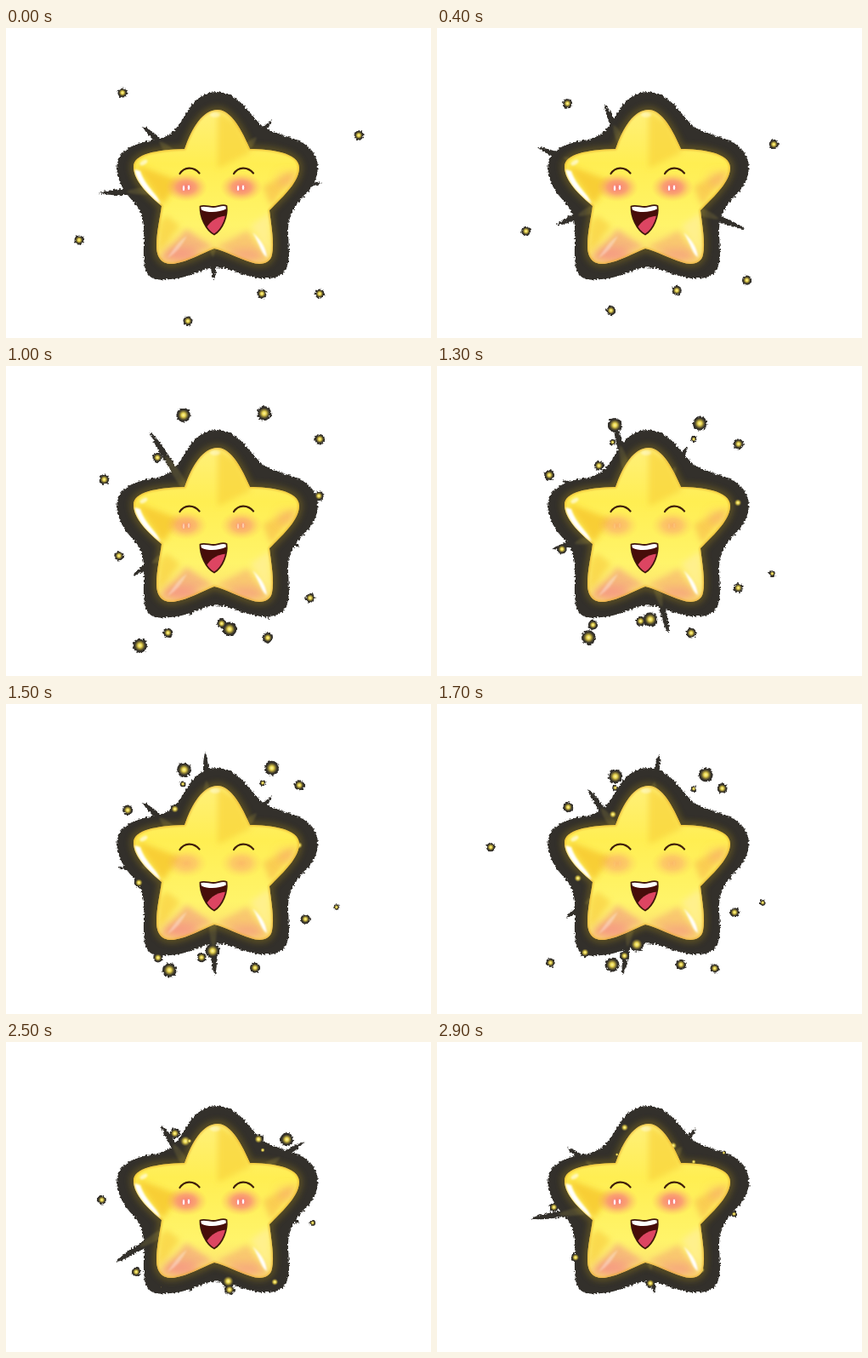
These frames come from a looping animation (500 px wide and 364 px high, 3100 ms). An HTML page:

```html
<!DOCTYPE html>
<html lang="en">
<head>
<meta charset="utf-8">
<title>Happy star</title>
<style>
  html, body { margin: 0; width: 100%; height: 100%; overflow: hidden; background: #fff; }
  svg { display: block; width: 500px; height: 364px; }
</style>
</head>
<body>
<svg viewBox="0 0 500 364">
  <defs>
    <path id="star" d="M249 96C262 96 274 112 287 142C310 142 345 146 345 164C345 180 328 196 310 214C312 232 316 252 313 266C311 277 299 279 288 275C272 270 258 262 245 259C232 264 215 274 197 277C182 278 177 268 177 256C177 240 181 224 183 209C168 196 150 180 150 163C150 148 176 143 210 142C219 116 232 96 249 96Z"/>
    <clipPath id="inside"><use href="#star"/></clipPath>
    <filter id="ragged" filterUnits="userSpaceOnUse" x="0" y="0" width="500" height="364" color-interpolation-filters="sRGB">
      <feTurbulence type="fractalNoise" baseFrequency=".45" numOctaves="1" seed="4"/>
      <feDisplacementMap in="SourceGraphic" scale="5" xChannelSelector="R" yChannelSelector="G"/>
    </filter>
    <filter id="b1" x="-50%" y="-50%" width="200%" height="200%"><feGaussianBlur stdDeviation=".8"/></filter>
    <filter id="b4" x="-50%" y="-50%" width="200%" height="200%"><feGaussianBlur stdDeviation="3.5"/></filter>
    <filter id="b7" x="-50%" y="-50%" width="200%" height="200%"><feGaussianBlur stdDeviation="6"/></filter>
    <linearGradient id="skin" x1="0" y1="0" x2="0" y2="1">
      <stop offset="0" stop-color="#fff07a"/>
      <stop offset=".35" stop-color="#ffee52"/>
      <stop offset=".75" stop-color="#fff46a"/>
      <stop offset="1" stop-color="#fbdc70"/>
    </linearGradient>
    <radialGradient id="spark">
      <stop offset="0" stop-color="#fff6a0"/>
      <stop offset=".35" stop-color="#e6d350"/>
      <stop offset=".65" stop-color="#a8963a" stop-opacity=".7"/>
      <stop offset="1" stop-color="#6a5e26" stop-opacity="0"/>
    </radialGradient>
    <radialGradient id="pink">
      <stop offset="0" stop-color="#f77c74"/>
      <stop offset=".45" stop-color="#f98f76" stop-opacity=".8"/>
      <stop offset="1" stop-color="#fcc060" stop-opacity="0"/>
    </radialGradient>
    <path id="eye" d="M-11 4C-6 -4 5 -5 12 3.5" fill="none" stroke="#40200c" stroke-width="2.2" stroke-linecap="round"/>
    <g id="marks" fill="#fff" stroke="#f57c78" stroke-width=".8">
      <ellipse cx="-3" cy=".6" rx="1.7" ry="3.5"/>
      <ellipse cx="3" cy="-.2" rx="1.7" ry="3.3"/>
    </g>
  </defs>

  <g fill="#33302b" filter="url(#ragged)">
    <g id="rayShade"></g>
    <g id="dotShade"></g>
    <path d="M249 75C272 76 284 97 298 112C312 126 340 126 355 139C372 153 370 176 354 194C338 210 331 222 332 243C333 262 336 282 322 291C304 298 285 292 266 285C252 280 240 280 228 286C212 293 192 297 176 295C160 291 162 270 162 250C163 232 162 216 150 204C136 190 128 172 131 158C134 141 158 133 178 131C200 126 206 108 216 94C224 82 235 75 249 75Z"/>
  </g>
  <use href="#star" fill="none" stroke="#77651c" stroke-width="8" opacity=".6" filter="url(#b4)"/>
  <g id="rayLight" fill="#ffe85c" opacity=".12" filter="url(#b1)"></g>
  <g id="dotLight" fill="url(#spark)"></g>

  <use href="#star" fill="url(#skin)"/>
  <g clip-path="url(#inside)">
    <g filter="url(#b4)">
      <path d="M249 98L249 165L288 146L274 112Z" fill="#f8d43c" opacity=".75"/>
      <path d="M152 160L205 180L184 208Z" fill="#f7c62c" opacity=".8"/>
      <path d="M344 165L302 186L312 210Z" fill="#f9c650" opacity=".8"/>
      <path d="M179 274L212 236L244 258Z" fill="#f6b07c" opacity=".8"/>
      <path d="M179 265L180 230L188 220L205 232Z" fill="#f8d244" opacity=".75"/>
      <path d="M310 276L284 238L247 258Z" fill="#f8c070" opacity=".8"/>
      <path d="M311 272L288 232L310 217Z" fill="#fff08c"/>
    </g>
    <g filter="url(#b7)" fill="#f59088">
      <ellipse cx="208" cy="267" rx="21" ry="9" opacity=".8"/>
      <ellipse cx="280" cy="268" rx="21" ry="7" opacity=".65"/>
      <ellipse cx="331" cy="178" rx="12" ry="8" opacity=".35"/>
    </g>
    <use href="#star" fill="none" stroke="#e6a62c" stroke-width="2.6" opacity=".7" filter="url(#b1)"/>
    <g filter="url(#b1)" fill="#fff">
      <path d="M151 166C154 183 168 196 182 207C178 194 164 187 158 168Z"/>
      <path d="M290 240C299 248 306 257 307 269C300 265 299 254 290 240Z"/>
      <path d="M190 270C197 260 203 250 213 244C207 255 201 264 190 270Z" opacity=".35"/>
      <ellipse cx="162" cy="158" rx="5" ry="2.5" opacity=".6" transform="rotate(-30 162 158)"/>
      <ellipse cx="246" cy="102" rx="6" ry="3" opacity=".4"/>
    </g>
  </g>

  <g id="blush" fill="url(#pink)">
    <ellipse cx="212" cy="187" rx="25" ry="17"/>
    <ellipse cx="277" cy="187" rx="25" ry="17"/>
  </g>
  <g id="shine">
    <use href="#marks" x="212" y="187.5"/>
    <use href="#marks" x="276" y="187.5"/>
  </g>
  <use href="#eye" x="215.5" y="167"/>
  <use href="#eye" x="279" y="167"/>

  <clipPath id="lips"><path id="mouth" d="M228.5 210C233 208 239 210.5 244 210.5C249 210.5 255 207 259.5 209.5C261 221 255 237 245 243C235 238 228 222 228.5 210Z"/></clipPath>
  <g transform="translate(0 -.5)">
    <use href="#mouth" fill="#470d0a"/>
    <g clip-path="url(#lips)">
      <path d="M233 240C238 229 247 221 262 221L258 246H236Z" fill="#dd4562"/>
      <path d="M226 206H262L259 213C251 217 238 218 230 214Z" fill="#fff"/>
    </g>
    <use href="#mouth" fill="none" stroke="#40180c" stroke-width="1.8"/>
  </g>
</svg>
<script>
const LOOP = 3100, STEP = 100, LAST = 29;
const RAYS = 8, SPIN = 60, LIFE = 2.6;
const $ = id => document.getElementById(id);

// Each wave sets off together; a path runs from x y to x y.
const waves = [
  { start: 0, size: 5.6, paths: ["137 76 244 158", "415 126 293 195", "369 312 340 209", "301 312 178 287", "214 344 153 264", "86 249 208 181"] },
  { start: .5, size: 8.4, paths: ["208 38 212 140", "295 36 341 138", "283 328 179 229", "123 344 303 262"] },
  { start: .9, size: 6, paths: ["374 84 249 133", "110 135 254 90", "311 321 233 272"] },
  { start: 1.1, size: 3.4, paths: ["302 79 302 168", "205 85 225 143", "400 249 327 181"] },
  { start: 1.6, size: 5.2, paths: ["131 308 195 198", "57 166 218 222", "328 314 294 221"] }
];

function set(el, attrs) {
  for (const key in attrs) el.setAttribute(key, attrs[key]);
}
function add(parent, tag, attrs = {}) {
  const el = document.createElementNS("http://www.w3.org/2000/svg", tag);
  set(el, attrs);
  return $(parent).appendChild(el);
}
const mix = (a, b, p) => a + (b - a) * p;
const spindle = (len, w) =>
  `M0 0C${len * .6} ${-w} ${len * .92} ${-w} ${len} 0C${len * .92} ${w} ${len * .6} ${w} 0 0Z`;

const rays = Array.from({ length: RAYS }, (_, i) => {
  const len = i % 4 ? 108 : 131;
  return [
    add("rayShade", "path", { d: spindle(len, 5) }),
    add("rayLight", "path", { d: spindle(len * .75, 6) })
  ];
});
const sparks = waves.flatMap(({ start, size, paths }) => paths.map(path => ({
  start, size,
  ends: path.split(" ").map(Number),
  shade: add("dotShade", "circle"),
  light: add("dotLight", "circle")
})));

function draw(t) {
  rays.forEach((parts, i) => {
    const angle = i * 360 / RAYS + SPIN * t - 2.5;
    parts.forEach(el => set(el, { transform: `translate(240 188) rotate(${angle})` }));
  });

  for (const { start, size, ends: [x0, y0, x1, y1], shade, light } of sparks) {
    const p = (t - start) / LIFE;
    const r = p > -1e-6 && p < 1 ? size * Math.min(1, (1 - p) * 4) : 0;
    const at = { cx: mix(x0, x1, p), cy: mix(y0, y1, p) };
    set(shade, { ...at, r });
    set(light, { ...at, r: r * .8 });
  }

  const glow = Math.min(1, .85 - .4 * Math.cos((t - 1.55) * 2 * Math.PI / 3.1));
  set($("blush"), { opacity: glow });
  set($("shine"), { opacity: (glow - .45) / .55 });
}

function tick() {
  const step = Math.min(LAST, Math.floor(performance.now() % LOOP / STEP));
  draw(step * STEP / 1000);
  requestAnimationFrame(tick);
}
tick();
</script>
</body>
</html>
```
